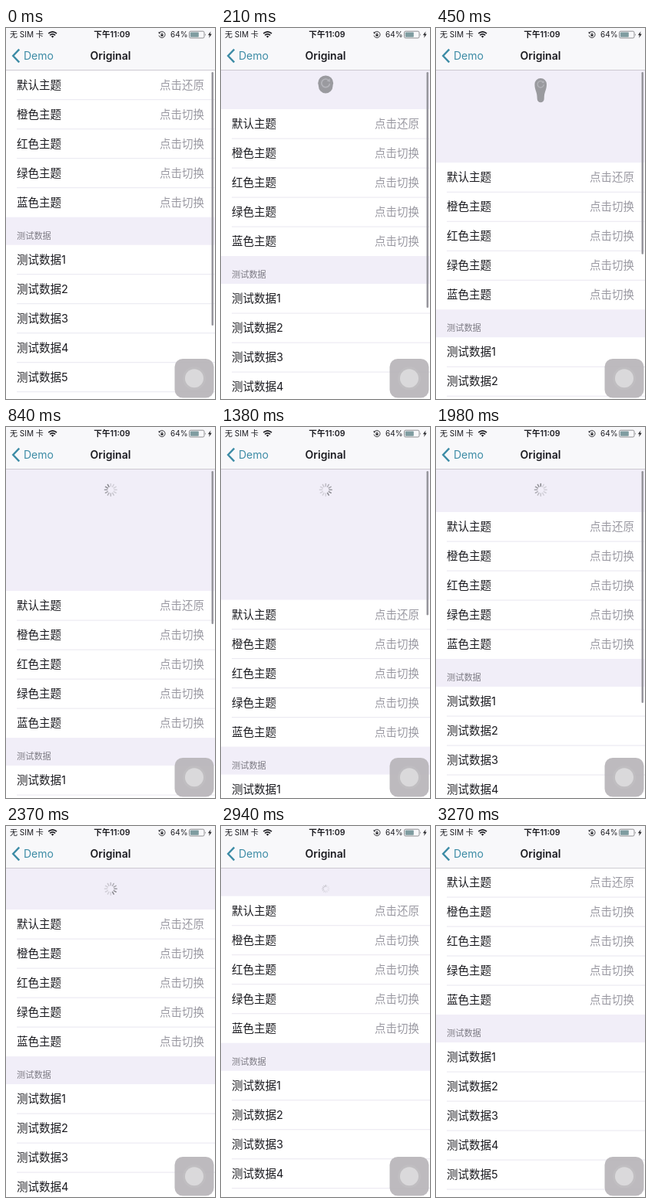
These frames come from a looping animation (272x480 px, 3300 ms). An HTML page:

```html
<!DOCTYPE html>
<html lang="zh-CN">
<head>
<meta charset="utf-8">
<title>Pull to refresh</title>
<style>
html, body { margin: 0; width: 100%; height: 100%; overflow: hidden; background: #f1eef8; }
svg { display: block; width: 100%; height: 100%; }
text { font-family: Inter, "Noto Sans CJK SC", "Noto Sans CJK", sans-serif; }
.row { font-size: 14.5px; fill: #1b1b20; }
.hint { font-size: 14.5px; fill: #9a99a2; text-anchor: end; }
.head { font-size: 11.2px; fill: #7c7a83; }
.teal { font-size: 14px; fill: #3d8ca6; }
.title { font-size: 14px; font-weight: 600; fill: #1b1b20; text-anchor: middle; }
.small { font-size: 10px; fill: #1b1b20; }
.clock { font-size: 10.6px; font-weight: 600; text-anchor: middle; }
</style>
</head>
<body>
<svg viewBox="0 0 272 480" preserveAspectRatio="none">
  <rect width="272" height="480" fill="#f1eef8"/>
  <g id="drop">
    <path id="blob" fill="#9a9a9f"/>
    <g id="arrow" fill="none" stroke="#b4b4ba" stroke-width="1.4">
      <path d="M3.2 -3.2A4.5 4.5 0 1 0 4.5 0.4"/>
      <path d="M1.2 -2.2L4.8 -1.4L4.6 -5.2Z" fill="#b4b4ba" stroke="none"/>
    </g>
  </g>
  <g id="spinner" stroke="#77777c" stroke-width="1.5" stroke-linecap="round"></g>
  <g id="list"></g>
  <rect id="bar" x="267.5" y="57" width="2.5" rx="1.2" fill="#96959c"/>

  <rect width="272" height="54" fill="#f8f8fa"/>
  <rect y="54" width="272" height="0.8" fill="#c3c1c8"/>
  <text class="small" x="5" y="12.1">无 SIM 卡</text>
  <g fill="none" stroke="#1b1b20" stroke-width="1.6">
    <path d="M55.2 7.2Q60.6 2.4 66 7.2M57.1 9.4Q60.6 6.3 64.1 9.4"/>
    <path d="M58.8 10.8Q60.6 9.4 62.4 10.8L60.6 12.8Z" fill="#1b1b20" stroke="none"/>
  </g>
  <text class="small clock" x="138" y="12.2">下午11:09</text>
  <g fill="none" stroke="#2a2a2e" stroke-width="0.9">
    <path d="M199.6 6.2A4.1 4.1 0 1 1 199 9.6"/>
    <path d="M198 5.6L201 5.2L199.8 8Z" fill="#2a2a2e" stroke="none"/>
    <rect x="201.4" y="8.2" width="3.2" height="2.5" fill="#2a2a2e" stroke="none"/>
    <path d="M202.1 8.2V7.4A0.9 0.9 0 0 1 203.9 7.4V8.2" stroke-width="0.7"/>
  </g>
  <text class="small" x="214" y="12.1">64%</text>
  <rect x="238.5" y="4.2" width="19.5" height="8.8" rx="1.8" fill="none" stroke="#77777a" stroke-width="0.8"/>
  <rect x="239.8" y="5.5" width="11" height="6.2" rx="0.8" fill="#7f9ca0"/>
  <path d="M259 7.2Q260.6 8.6 259 10Z" fill="#77777a"/>
  <path d="M266.6 4.2L262.8 9.2H265L264 13L267.8 7.8H265.6Z" fill="#2a2a2e"/>
  <path d="M17.2 27.6L9.2 36L17.2 44.4" fill="none" stroke="#3d8ca6" stroke-width="2.4"/>
  <text class="teal" x="23" y="41">Demo</text>
  <text class="title" x="136" y="41">Original</text>

  <rect x="219.5" y="428" width="51" height="50.5" rx="10.5" fill="#bab7bb" fill-opacity="0.95"/>
  <circle cx="245" cy="453.3" r="15" fill="#fff" fill-opacity="0.06"/>
  <circle cx="245" cy="453.3" r="12" fill="#fff" fill-opacity="0.42"/>
</svg>
<script>
const LOOP = 3300, TOP = 54, ROW = 38, HEAD = 36;
const REST = 54, TRIGGER = 480, RELEASE = 1435, FINISH = 2790;
const $ = id => document.getElementById(id);
const clamp = x => Math.max(0, Math.min(1, x));
const mix = (a, b, p) => a + (b - a) * p;
const ease = p => p * p * (3 - 2 * p);
const span = (t, start, length) => clamp((t - start) / length);

function add(parent, tag, attrs, content) {
  const el = document.createElementNS("http://www.w3.org/2000/svg", tag);
  for (const key in attrs) el.setAttribute(key, attrs[key]);
  if (content) el.textContent = content;
  parent.appendChild(el);
  return el;
}

function addRows(names, y, hint) {
  const list = $("list");
  add(list, "rect", { y, width: 272, height: names.length * ROW, fill: "#fff" });
  names.forEach((name, i) => {
    const top = y + i * ROW;
    add(list, "text", { class: "row", x: 14, y: top + 24 }, name);
    if (hint) add(list, "text", { class: "hint", x: 258, y: top + 24 }, hint(i));
    if (i) add(list, "rect", { x: 14, y: top - 0.4, width: 258, height: 0.9, fill: "#e6e4ee" });
  });
}

const themes = ["默认", "橙色", "红色", "绿色", "蓝色"].map(c => c + "主题");
const data = Array.from({ length: 10 }, (_, i) => "测试数据" + (i + 1));
const headTop = themes.length * ROW;
addRows(themes, 0, i => i ? "点击切换" : "点击还原");
add($("list"), "text", { class: "head", x: 14, y: headTop + 28 }, "测试数据");
addRows(data, headTop + HEAD);

const spokes = Array.from({ length: 12 }, (_, i) =>
  add($("spinner"), "line", { y1: -4.6, y2: -7.9, transform: `rotate(${i * 30})` }));

// finger drag: time, distance
const drag = [[0, 0.5], [130, 27], [450, 120], [840, 158], [1150, 167.5], [RELEASE, 170]];

function dragAt(t) {
  let i = 0;
  while (i < drag.length - 2 && t > drag[i + 1][0]) i++;
  const slope = k => {
    const a = drag[Math.max(0, k - 1)], b = drag[Math.min(drag.length - 1, k + 1)];
    return (b[1] - a[1]) / (b[0] - a[0]);
  };
  const [t0, y0] = drag[i], [t1, y1] = drag[i + 1];
  const d = t1 - t0, u = (t - t0) / d, v = 1 - u;
  return y0 * (1 + 2 * u) * v * v + slope(i) * d * u * v * v
       + y1 * u * u * (3 - 2 * u) - slope(i + 1) * d * u * u * v;
}

function pullAt(t) {
  if (t < RELEASE) return dragAt(t);
  if (t < FINISH) {
    const w = (t - RELEASE) * 0.011;
    return REST + (170 - REST) * (1 + w) * Math.exp(-w);
  }
  return REST * (1 - ease(span(t, FINISH, 400)));
}

function drawDrop(t, pull) {
  const gone = span(t, TRIGGER, 150);
  const p = clamp((pull - 34) / 86) * (1 - gone);
  const R = mix(10.5, 7.8, p), r = mix(10.5, 4.5, p), len = 19 * p, x = 136.2;
  const y = pull < 34 ? 37 + pull : mix(71, 72.8, p);
  const end = y + len;
  $("blob").setAttribute("d",
    `M${x - R} ${y}A${R} ${R} 0 0 1 ${x + R} ${y}` +
    `C${x + R} ${y + len * 0.45} ${x + r} ${y + len * 0.45} ${x + r} ${end}` +
    `A${r} ${r} 0 0 1 ${x - r} ${end}` +
    `C${x - r} ${y + len * 0.45} ${x - R} ${y + len * 0.45} ${x - R} ${y}Z`);
  $("arrow").setAttribute("transform", `translate(${x} ${y}) scale(${R / 8.4})`);
  $("drop").setAttribute("opacity", 1 - gone);
}

function drawSpinner(t) {
  const show = span(t, TRIGGER + 50, 150), hide = span(t, FINISH, 350);
  const scale = mix(0.2, 1, show) * mix(1, 0.1, hide);
  $("spinner").setAttribute("transform", `translate(136.3 81.3) scale(${scale})`);
  $("spinner").setAttribute("opacity", show * (1 - hide));
  const lead = Math.floor(t * 12 / 1000) + 1;
  spokes.forEach((spoke, i) => {
    const age = ((lead - i) % 12 + 12) % 12;
    spoke.setAttribute("opacity", Math.max(0.25, 0.88 - age * 0.09));
  });
}

function draw(t) {
  const pull = pullAt(t);
  $("list").setAttribute("transform", `translate(0 ${TOP + pull})`);
  $("bar").setAttribute("height", Math.min(385, 413 - pull) - 57);
  $("bar").setAttribute("opacity", 1 - span(t, 1980, 250));
  drawDrop(t, pull);
  drawSpinner(t);
}

const start = performance.now();
function tick() {
  draw((performance.now() - start) % LOOP);
  requestAnimationFrame(tick);
}
tick();
</script>
</body>
</html>
```
